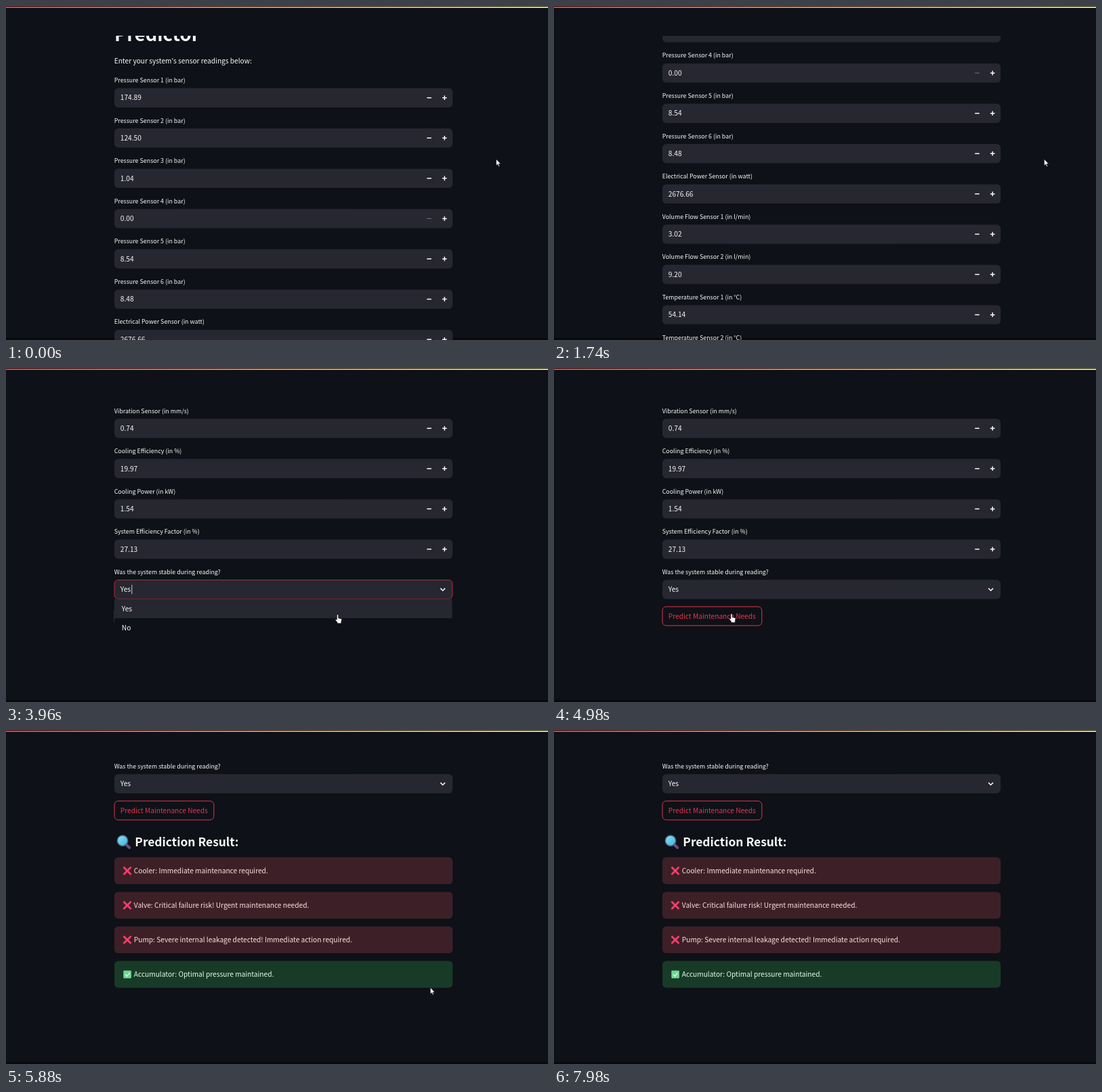
Recreate the animation shown at these times as an HTML page. Size 800 px wide and 494 px high, loop 8.04 s.

```html
<!DOCTYPE html>
<html lang="en">
<head>
<meta charset="utf-8">
<title>Predictor</title>
<style>
  html, body { margin: 0; width: 100%; height: 100%; overflow: hidden; background: #0e1117; }
  svg { display: block; }
  text { font-family: "Noto Sans CJK JP", "Noto Sans CJK SC", "Noto Sans CJK", "Open Sans", sans-serif; fill: #fafafa; white-space: pre; }
  .label { font-size: 8.89px; }
  .body { font-size: 10.16px; }
  .h1 { font-size: 27.3px; font-weight: 700; }
  .h2 { font-size: 17.4px; font-weight: 700; }
  .deg { font-family: "Open Sans", sans-serif; font-size: 7.5px; }
  .field { fill: #262730; }
  .icon { fill: none; stroke: #fafafa; stroke-width: 1.5; }
  .dim { stroke: #6c6d75; stroke-width: 1.1; }
  #focus rect { fill: none; stroke: #b02b42; }
  #button rect { fill: none; stroke: #41434b; }
  #button.hot rect { stroke: #e3344f; }
  #button.hot text { fill: #e8354f; }
</style>
</head>
<body>
<svg id="stage" width="800" height="494" viewBox="0 0 800 494">
  <defs>
    <linearGradient id="stripe">
      <stop offset="0" stop-color="#ff4b4b"/>
      <stop offset="1" stop-color="#fffd80"/>
    </linearGradient>
    <linearGradient id="glass" x2="1" y2="1">
      <stop offset="0" stop-color="#8fe3f5"/>
      <stop offset="1" stop-color="#35b3dd"/>
    </linearGradient>
    <clipPath id="view"><rect y="44" width="800" height="450"/></clipPath>
  </defs>
  <rect width="800" height="494" fill="#0e1117"/>
  <rect y="491" width="800" height="3" fill="#08090c"/>
  <g clip-path="url(#view)"><g id="page"></g></g>
  <rect width="800" height="1" fill="#08090c"/>
  <rect y="1" width="800" height="1.7" fill="url(#stripe)"/>
  <g id="cursor" stroke="#0b0c10" stroke-width=".6" stroke-linejoin="round" fill="#fff">
    <path id="arrow" d="M0 0V9.6L2.2 7.6 3.6 10.9 5.1 10.3 3.7 7.1H6.7Z"/>
    <path id="hand" d="M-1.1 0Q0-1.2 1.1 0V4.6L5.4 5.6Q6.2 5.9 6 7L5.3 10.2V12.4H-.5V11L-3.2 7.6Q-3.4 6.2-2.1 6.4L-1.1 7.3Z"/>
  </g>
</svg>
<script>
const LOOP = 8040, STEP = 60;
const LEFT = 160, WIDTH = 499.3, TOP = 121.5, PITCH = 59.58, HEIGHT = 28.4;
const $ = id => document.getElementById(id);

const fields = [
  ["Pressure Sensor 1 (in bar)", "174.89"],
  ["Pressure Sensor 2 (in bar)", "124.50"],
  ["Pressure Sensor 3 (in bar)", "1.04"],
  ["Pressure Sensor 4 (in bar)", "0.00"],
  ["Pressure Sensor 5 (in bar)", "8.54"],
  ["Pressure Sensor 6 (in bar)", "8.48"],
  ["Electrical Power Sensor (in watt)", "2676.66"],
  ["Volume Flow Sensor 1 (in l/min)", "3.02"],
  ["Volume Flow Sensor 2 (in l/min)", "9.20"],
  ["Temperature Sensor 1 (in °C)", "54.14"],
  ["Temperature Sensor 2 (in °C)", "58.59"],
  ["Temperature Sensor 3 (in °C)", "55.78"],
  ["Temperature Sensor 4 (in °C)", "49.56"],
  ["Vibration Sensor (in mm/s)", "0.74"],
  ["Cooling Efficiency (in %)", "19.97"],
  ["Cooling Power (in kW)", "1.54"],
  ["System Efficiency Factor (in %)", "27.13"]
];
const alerts = [
  "Cooler: Immediate maintenance required.",
  "Valve: Critical failure risk! Urgent maintenance needed.",
  "Pump: Severe internal leakage detected! Immediate action required.",
  "Accumulator: Optimal pressure maintained."
];

const text = (x, y, cls, str, extra = "") => `<text x="${x}" y="${y}" class="${cls}" ${extra}>${
  str.replace("°", '<tspan class="deg" dy="-1">°</tspan><tspan dy="1">').replace(/(<tspan dy="1">.*)$/, "$1</tspan>")}</text>`;
const box = (y, w, h, extra) => `<rect x="${LEFT}" y="${y}" width="${w}" height="${h}" rx="5.7" ${extra}/>`;
const line = (d, cls = "") => `<path class="icon ${cls}" d="${d}"/>`;

function fieldBase(i, label, value) {
  const y = TOP + i * PITCH;
  return text(LEFT - .3, y - 8.5, "label", label) +
    box(y, WIDTH, HEIGHT, 'class="field"') +
    text(168.8, y + 17.9, "body", value);
}

function numberField([label, value], i) {
  const mid = TOP + i * PITCH + HEIGHT / 2;
  return fieldBase(i, label, value) +
    line(`M621.3 ${mid}h6.6`, value === "0.00" ? "dim" : "") +
    line(`M644 ${mid}h6.6M647.3 ${mid - 3.3}v6.6`);
}

function alertBox(str, i) {
  const y = 1257.3 + i * 51.1, good = i === 3;
  const mark = good
    ? `<rect x="173.3" y="${y + 14.1}" width="11.6" height="11.6" rx="1.4" fill="#6fd693"/>
       <path d="M176 ${y + 20}l2.4 2.5 4-5" fill="none" stroke="#e6fbed" stroke-width="1.4"/>`
    : `<path d="M174.3 ${y + 15.2}l9.4 9.4m0-9.4l-9.4 9.4" stroke="#f43e6c" stroke-width="2.8" stroke-linecap="round"/>`;
  return box(y, WIDTH, 39.6, `fill="${good ? "#183b27" : "#3d2027"}"`) + mark +
    text(188.8, y + 23.6, "body", str, `style="fill:${good ? "#dffde9" : "#ffdede"}"`);
}

const selY = TOP + fields.length * PITCH;
const menuY = selY + HEIGHT;
const magnifier = `<path d="M178 1239l4.2 4" stroke="#6d4a86" stroke-width="4" stroke-linecap="round"/>
  <circle cx="172" cy="1232.7" r="7.7" fill="url(#glass)" stroke="#59637a" stroke-width="1.5"/>`;

$("page").innerHTML =
  text(LEFT, 52.2, "h1", "Predictor") +
  text(159.7, 84.7, "body", "Enter your system's sensor readings below:") +
  fields.map(numberField).join("") +
  fieldBase(fields.length, "Was the system stable during reading?", "Yes") +
  line(`M641.3 ${selY + 12.5}l3.4 3.4 3.4-3.4`) +
  `<g id="focus">${box(selY + .1, WIDTH - .4, HEIGHT - .4, "")}
    <path d="M185.8 ${selY + 7.5}v13.5" stroke="#fafafa" stroke-width=".8"/></g>
  <g id="button">${box(1174, 146.8, 28, "")}${text(168.8, 1192, "body", "Predict Maintenance Needs")}</g>
  <g id="menu">
    <rect x="${LEFT}" y="${menuY}" width="${WIDTH}" height="57" fill="#0e1117"/>
    <rect x="${LEFT}" y="${menuY}" width="498.6" height="28.3" class="field"/>
    ${text(170.8, menuY + 18.3, "body", "Yes")}${text(170.8, menuY + 46.7, "body", "No")}
  </g>
  <g id="results">${magnifier}${text(190.3, 1240.9, "h2", "Prediction Result:")}${alerts.map(alertBox).join("")}</g>`;

// Rows of [time, value...]
const scrollKeys = [
  [0, 0], [480, 14], [1140, 91], [1980, 265], [2820, 470.7], [3300, 821],
  [5580, 821], [5700, 854.5], [5880, 1069]
];
const cursorKeys = [
  [0, 723.5, 226.5], [3300, 723.5, 226.5], [3660, 490, 325], [3780, 490, 325],
  [3900, 489.5, 365.3], [4320, 489.5, 365.3], [4800, 262, 364], [5160, 262, 364],
  [5580, 626.3, 380.8], [5880, 626.3, 380.8], [6360, 752.3, 401.5],
  [7140, 752.3, 401.5], [7440, 753, 38]
];
const smooth = u => u * u * (3 - 2 * u);

function sample(keys, t, ease = u => u) {
  const i = keys.findIndex(k => k[0] > t);
  if (i < 0) return keys[keys.length - 1].slice(1);
  const a = keys[i - 1], b = keys[i], u = ease((t - a[0]) / (b[0] - a[0]));
  return a.slice(1).map((v, n) => v + (b[n + 1] - v) * u);
}

const show = (id, on) => { $(id).style.display = on ? "" : "none"; };
const between = (t, a, b) => t >= a && t < b;

function draw(now) {
  const t = Math.floor(Math.max(0, now - start) % LOOP / STEP) * STEP;
  const [scroll] = sample(scrollKeys, t);
  const [x, y] = sample(cursorKeys, t, smooth);
  $("page").setAttribute("transform", `translate(0 ${-scroll})`);
  $("cursor").setAttribute("transform", `translate(${x} ${y})`);
  const hand = between(t, 3600, 5220);
  show("hand", hand);
  show("arrow", !hand);
  show("cursor", t < 7500);
  show("focus", between(t, 3720, 4920));
  show("menu", between(t, 3780, 4320));
  show("results", t >= 5160);
  $("button").classList.toggle("hot", t >= 4680);
  requestAnimationFrame(draw);
}

const start = performance.now();
draw(start);
</script>
</body>
</html>
```
